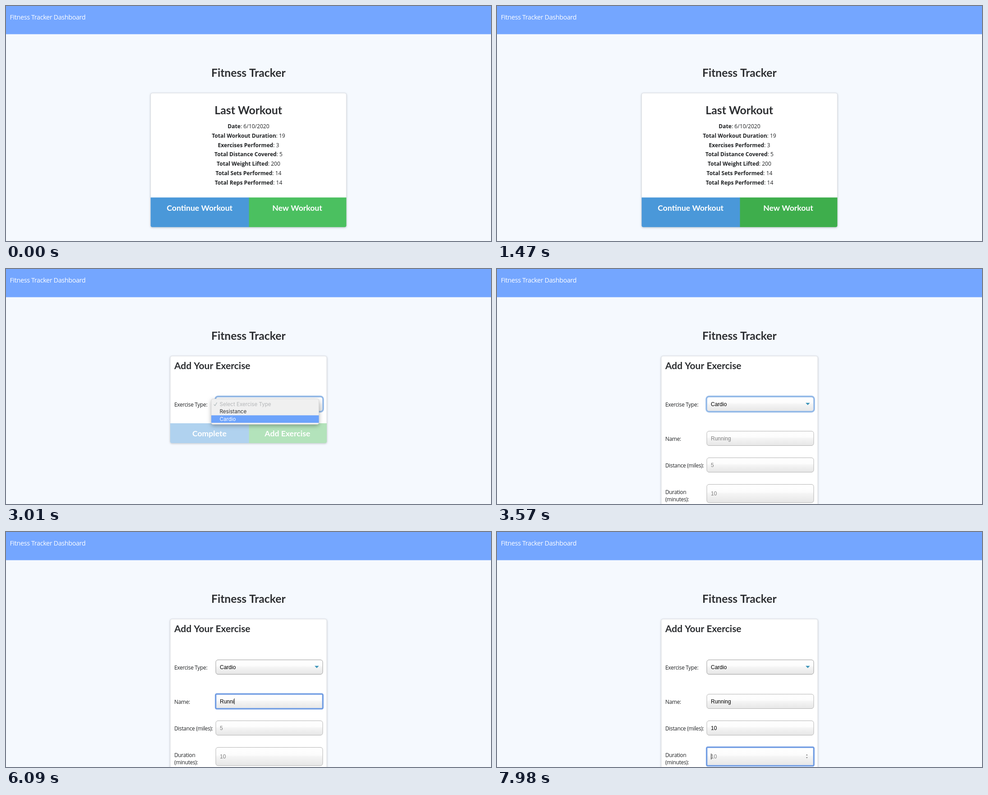
Write an HTML page with a canvas that moves like this. It is 1075 by 521 pixels and loops after 8000 ms.

```html
<!DOCTYPE html>
<html lang="en">
<head>
<meta charset="utf-8">
<title>Fitness Tracker</title>
<style>
html, body { margin: 0; width: 100%; height: 100%; overflow: hidden; background: #f5f9fe; }
canvas { display: block; width: 1075px; height: 521px; }
</style>
</head>
<body>
<canvas id="stage"></canvas>
<script>
const W = 1075, H = 521, LOOP = 8000, STEP = 70;
const canvas = document.getElementById('stage');
const ratio = window.devicePixelRatio || 1;
canvas.width = W * ratio;
canvas.height = H * ratio;
const ctx = canvas.getContext('2d');

const HEAD = 'Lato, sans-serif';
const BODY = '"Open Sans", sans-serif';
const FIELD = '"Liberation Sans", Arial, sans-serif';
const MENU = 'Inter, sans-serif';
const INK = '#2c2e31', BLUE = '#4a98d9';
const TIGHT = -0.025;

// Moments in the story, in ms
const AT = {
  hover: 980, form: 1890, open: 2590, resistance: 2800, cardio: 2870,
  picked: 3500, name: 5250, type: 5530, distance: 6720, digits: 7070, duration: 7700
};
const KEY = 140;

const stats = [
  ['Date', '6/10/2020'], ['Total Workout Duration', '19'], ['Exercises Performed', '3'],
  ['Total Distance Covered', '5'], ['Total Weight Lifted', '200'],
  ['Total Sets Performed', '14'], ['Total Reps Performed', '14']
];

function setFont(size, family, weight = 400, spacing = 0) {
  ctx.font = `${weight} ${size}px ${family}`;
  ctx.letterSpacing = `${spacing * size}px`;
}

function text(str, x, y, size, family, color, weight = 400, align = 'left', spacing = 0) {
  setFont(size, family, weight, spacing);
  ctx.textAlign = align;
  ctx.fillStyle = color;
  ctx.fillText(str, x, y);
}

const heading = (str, x, y, size, color = INK, align = 'center') =>
  text(str, x, y, size, HEAD, color, 700, align);

const label = (str, y) => text(str, 373, y, 11.9, BODY, '#1f2123', 500, 'left', TIGHT);

function box(x, y, w, h, r, fill) {
  ctx.beginPath();
  ctx.roundRect(x, y, w, h, r);
  if (fill) {
    ctx.fillStyle = fill;
    ctx.fill();
  }
}

function outline(x, y, w, h, r, color, width) {
  box(x, y, w, h, r);
  ctx.strokeStyle = color;
  ctx.lineWidth = width;
  ctx.stroke();
}

function shadowBox(x, y, w, h, r, fill, color, blur, dy) {
  ctx.save();
  ctx.shadowColor = color;
  ctx.shadowBlur = blur * ratio;
  ctx.shadowOffsetY = dy * ratio;
  box(x, y, w, h, r, fill);
  ctx.restore();
}

function card(x, y, w, h) {
  shadowBox(x, y, w, h, 4, '#fff', 'rgba(90,95,105,.4)', 4, 1);
  outline(x, y, w, h, 4, '#d9dce0', 0.9);
}

function buttons(x, y, w, h, left, right, leftFill, rightFill, baseline) {
  const mid = 538.5;
  box(x, y, mid + 0.5 - x, h, [0, 0, 0, 4], leftFill);
  box(mid, y, x + w - mid, h, [0, 0, 4, 0], rightFill);
  heading(left, (x + mid) / 2 - 0.3, baseline, 17.6, '#fff');
  heading(right, (mid + x + w) / 2 - 0.9, baseline, 17.6, '#fff');
}

function mix(a, b, k) {
  return `rgb(${a.map((v, i) => Math.round(v + (b[i] - v) * k)).join(',')})`;
}

function page() {
  ctx.fillStyle = '#f5f9fe';
  ctx.fillRect(0, 0, W, H);
  ctx.fillStyle = '#74a6ff';
  ctx.fillRect(0, 0, W, 62.5);
  text('Fitness Tracker Dashboard', 8.5, 30, 14.35, BODY, '#fff', 500, 'left', TIGHT);
  heading('Fitness Tracker', 537.3, 157, 24.65);
}

function summary(t) {
  card(320.6, 193, 433.8, 297.2);
  heading('Last Workout', 537.2, 239.5, 24.8);
  stats.forEach(([key, value], i) => {
    const y = 271 + i * 20.75, rest = ': ' + value;
    setFont(12.1, BODY, 700);
    const keyWidth = ctx.measureText(key).width;
    setFont(12.1, BODY);
    const x = 537.5 - (keyWidth + ctx.measureText(rest).width) / 2;
    text(key, x, y, 12.1, BODY, '#1f2123', 700);
    text(rest, x + keyWidth, y, 12.1, BODY, '#1f2123');
  });
  const k = Math.min(1, Math.max(0, (t - AT.hover) / 100));
  buttons(320.6, 424.6, 433.8, 65.6, 'Continue Workout', 'New Workout',
    BLUE, mix([75, 192, 96], [62, 174, 76], k), 454);
}

function field(y, h, border, ring) {
  const g = ctx.createLinearGradient(0, y, 0, y + h);
  [[0, '#fff'], [0.42, '#fcfcfc'], [0.5, '#f5f5f5'], [1, '#e6e6e6']]
    .forEach(stop => g.addColorStop(...stop));
  box(465, y, 237, h, 5, g);
  if (!ring) {
    outline(465, y, 237, h, 5, border, 1);
    return;
  }
  const d = ring.grow;
  const halo = (color, width) =>
    outline(465 - d, y - d, 237 + 2 * d, h + 2 * d, ring.radius, color, width);
  halo(ring.soft, ring.width + 1.6);
  halo(ring.core, ring.width);
}

const selectRing = { radius: 6, grow: 0.9, width: 2.6, soft: '#c3d9f3', core: '#8fb6e6' };
const inputRing = { radius: 2.5, grow: 0.3, width: 2.1, soft: '#a3c0ef', core: '#6795df' };

function caret(x, y) {
  ctx.fillStyle = '#111';
  ctx.fillRect(x, y - 6.5, 1, 13);
}

function spinner(y) {
  ctx.fillStyle = '#777';
  for (const s of [-1, 1]) {
    ctx.beginPath();
    ctx.moveTo(684.8, y + s * 2);
    ctx.lineTo(688.8, y + s * 2);
    ctx.lineTo(686.8, y + s * 4.6);
    ctx.fill();
  }
}

function input(y, h, hint, value, focused, numeric) {
  const mid = y + h / 2;
  field(y, h, '#b3b3b3', focused && inputRing);
  if (focused && numeric) spinner(mid - 0.5);
  text(value || hint, 474, mid + 4.2, 12, FIELD, value ? '#000' : '#808080');
  if (focused) caret(474.3 + (value ? ctx.measureText(value).width : 0), mid);
}

function picker(value, focused) {
  field(283.5, 32, '#9b9b9b', focused && selectRing);
  text(value, 474, 304, 12, FIELD, '#000');
  ctx.fillStyle = '#3a93b8';
  ctx.beginPath();
  ctx.moveTo(684, 296.8);
  ctx.lineTo(693.6, 296.8);
  ctx.lineTo(688.8, 301.8);
  ctx.fill();
}

function menu(active) {
  shadowBox(455, 288, 238.5, 56.5, 4, '#f0f0f0', 'rgba(0,0,0,.32)', 10, 3);
  outline(455, 288, 238.5, 56.5, 4, '#d0d0d0', 0.6);
  if (active) {
    ctx.fillStyle = '#6da3fb';
    ctx.fillRect(455, 308 + (active - 1) * 16.4, 238.5, 16.6);
  }
  ctx.strokeStyle = '#a9b4b6';
  ctx.lineWidth = 1.2;
  ctx.beginPath();
  ctx.moveTo(460.8, 300.3);
  ctx.lineTo(463.3, 303);
  ctx.lineTo(467.6, 296);
  ctx.stroke();
  ['Select Exercise Type', 'Resistance', 'Cardio'].forEach((item, i) => {
    const color = i === 0 ? '#b4b6b8' : i === active ? '#fff' : '#303234';
    text(item, 473.5, 303.8 + i * 16.4, 11.6, MENU, color);
  });
}

const typed = (word, t, start) =>
  word.slice(0, Math.max(0, Math.floor((t - start) / KEY) + 1));

function form(t) {
  const picked = t >= AT.picked;
  card(364, 193, 347, picked ? 420 : 193);
  heading('Add Your Exercise', 373, 222, 21, INK, 'left');
  label('Exercise Type:', 304.5);
  picker(picked ? 'Cardio' : 'Select Exercise Type', t >= AT.open && t < AT.name);
  if (!picked) {
    buttons(364, 342, 347, 44, 'Complete', 'Add Exercise', '#b0d2ef', '#b3e3bb', 371);
    if (t >= AT.open) menu(t >= AT.cardio ? 2 : t >= AT.resistance ? 1 : 0);
    return;
  }
  label('Name:', 381);
  label('Distance (miles):', 439.5);
  label('Duration', 498.5);
  label('(minutes):', 515);
  input(359.5, 32, 'Running', typed('Running', t, AT.type), t >= AT.name && t < AT.distance);
  input(418.5, 32, '5', typed('10', t, AT.digits), t >= AT.distance && t < AT.duration, true);
  input(477.5, 40.5, '10', '', t >= AT.duration, true);
}

function draw(now) {
  const t = Math.floor((now % LOOP) / STEP) * STEP;
  ctx.setTransform(ratio, 0, 0, ratio, 0, 0);
  page();
  if (t < AT.form) summary(t);
  else form(t);
  requestAnimationFrame(draw);
}

requestAnimationFrame(draw);
</script>
</body>
</html>
```
